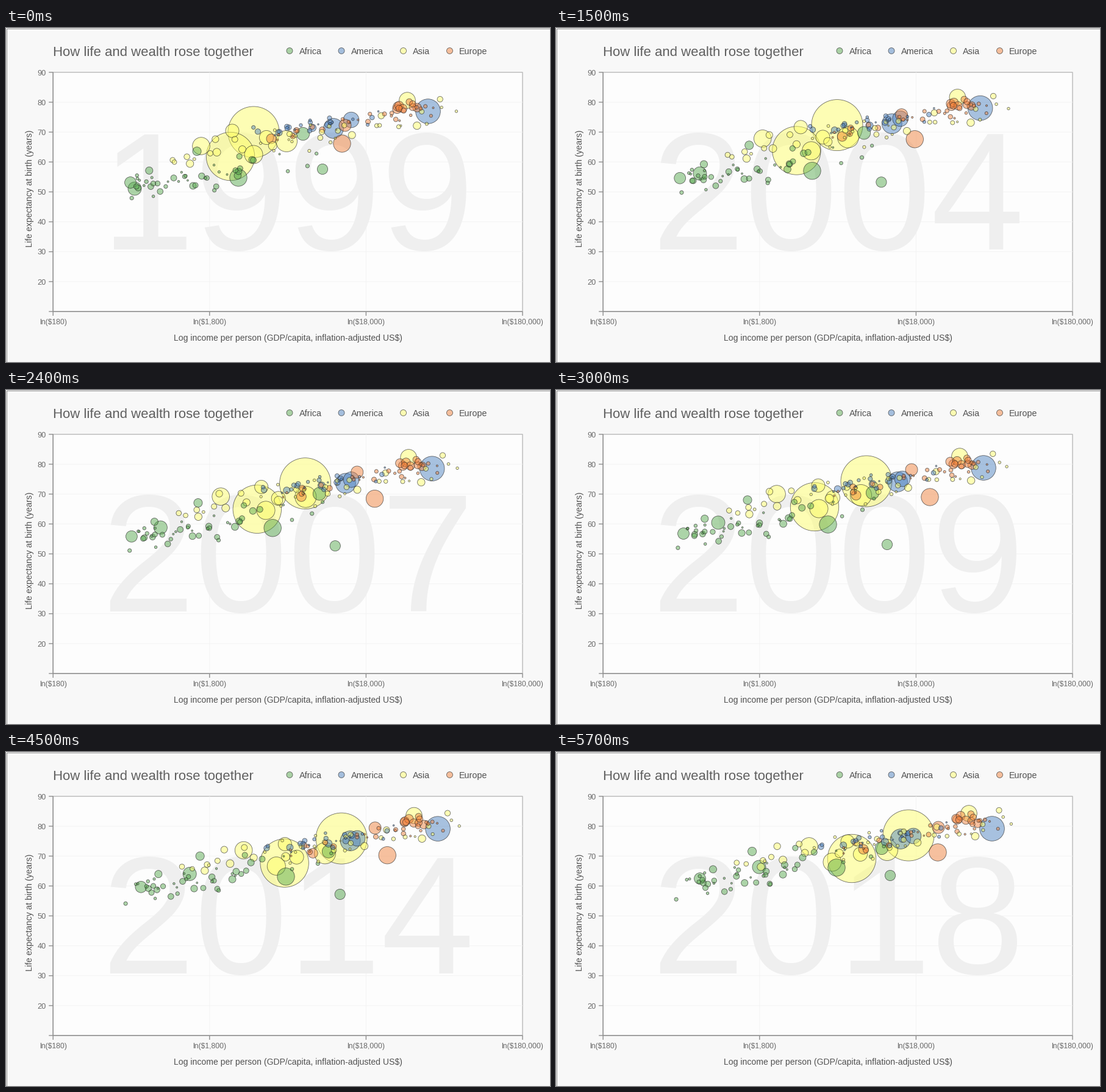
A matplotlib script for the animation above (6 s loop, 892 by 549 pixels).

```python
import numpy as np
import matplotlib.pyplot as plt
from matplotlib.animation import FuncAnimation
from matplotlib.patches import Circle, Rectangle

W, H, DPI = 892, 549, 100
FIRST_YEAR, YEARS, STEP_MS = 1999, 20, 300
LEFT, RIGHT, TOP, BOTTOM = 77.2, 847, 72.8, 466
INK, SOFT, AXIS, GRID = "#525252", "#6a6a6a", "#8f8f8f", "#f4f4f4"
COLORS = {"Africa": "#55a84c", "America": "#4a80bf",
          "Asia": "#ffff66", "Europe": "#f07f38"}

# The most populous countries: radius, then position at start, middle and end
GIANTS = {
    "Asia": [
        (42, (406, 171), (509, 150), (578, 137)),
        (39.7, (368, 211), (424, 192), (485, 175)),
        (17.5, (460, 186), (500, 173), (543, 161)),
        (15, (406, 208), (431, 195), (453, 181)),
        (14.3, (320, 194), (362, 171), (415, 155)),
        (13.3, (658, 119), (662, 109), (677, 101)),
        (11, (371, 169), (430, 157), (478, 147)),
        (11.5, (427, 180), (454, 177), (499, 168)),
    ],
    "Africa": [
        (14.2, (381, 246), (446, 221), (460, 190)),
        (11, (211, 264), (266, 218), (333, 189)),
        (9.4, (204, 254), (209, 236), (236, 208)),
        (10.6, (487, 174), (519, 169), (534, 158)),
        (8.6, (519, 232), (543, 254), (548, 203)),
    ],
    "America": [
        (20.3, (692, 137), (701, 128), (715, 126)),
        (16.4, (537, 165), (560, 151), (565, 143)),
        (12.8, (566, 151), (568, 146), (586, 138)),
    ],
    "Europe": [
        (14.2, (551, 190), (613, 176), (626, 165)),
        (10, (556, 160), (583, 131), (627, 124)),
        (8, (435, 182), (492, 173), (504, 160)),
    ],
}

# The rest fill bands: continent, count, radius range, skew towards the
# poor end, scatter, and the band's two ends in the first and last year
BANDS = [
    ("Africa", 45, (1.2, 8), 2.4, 13, ((205, 262), (590, 205)), ((215, 221), (610, 150))),
    ("America", 24, (1.2, 8), 1.2, 7, ((400, 172), (610, 138)), ((435, 157), (650, 118))),
    ("Asia", 40, (1.2, 9), 1.5, 11, ((275, 218), (780, 128)), ((305, 182), (795, 108))),
    ("Europe", 26, (1.2, 6), 0.9, 6, ((420, 182), (720, 125)), ((450, 164), (735, 108))),
    ("Europe", 9, (5, 11), 1.0, 3, ((640, 129), (682, 127)), ((660, 108), (702, 113))),
]


def giants():
    """A smooth parabola through the three positions of each country."""
    years, keys = np.arange(YEARS), (0, 10, YEARS - 1)
    for name, rows in GIANTS.items():
        for radius, *path in rows:
            fit = np.polyfit(keys, path, 2)
            yield name, radius, np.outer(years ** 2, fit[0]) + np.outer(years, fit[1]) + fit[2]


def crowd(seed=7):
    """Each country keeps its place in a band while the band moves."""
    rng = np.random.default_rng(seed)
    years = np.arange(YEARS)
    t = years[:, None] / (YEARS - 1)
    for name, count, (small, big), skew, scatter, first, last in BANDS:
        for rank in range(count):
            u = rng.beta(1, skew)
            radius = small + (big - small) * rng.beta(1.1, 2) * (1 - 0.3 * u)
            offset = rng.normal(0, (0.3, 1)) * scatter
            begin, end = ((1 - u) * np.array(a) + u * np.array(b) for a, b in (first, last))
            end = end + rng.normal(0, (1, 0.3)) * scatter
            sway = np.sin(years * rng.uniform(0.2, 0.5))[:, None] * (2.5, 0.8)
            yield name, radius, begin * (1 - t) + end * t + offset + sway


plt.rcParams["font.family"] = "Liberation Sans"
fig = plt.figure(figsize=(W / 100, H / 100), dpi=DPI, facecolor="#f8f8f8")
ax = fig.add_axes([0, 0, 1, 1])
ax.set_xlim(0, W)
ax.set_ylim(H, 0)
ax.axis("off")


def px(size):
    return size * 72 / DPI


def label(x, y, text, size, color=INK, ha="left", va="baseline", **kw):
    return ax.text(x, y, text.replace("$", r"\$"), fontsize=px(size),
                   color=color, ha=ha, va=va, **kw)


def line(x0, y0, x1, y1, color=AXIS, width=1.4, z=1.0):
    ax.plot([x0, x1], [y0, y1], color=color, lw=px(width), zorder=z,
            solid_capstyle="butt", snap=False)


def bubble(x, y, radius, name):
    return ax.add_patch(Circle((x, y), radius, facecolor=COLORS[name] + "7a",
                               edgecolor="#222222b0", lw=px(0.8), zorder=5))


def draw_chart():
    ax.add_patch(Rectangle((0.5, 0.5), W - 1, H - 1, fill=False,
                           edgecolor="#8c8c8c", lw=px(1)))
    ax.add_patch(Rectangle((LEFT, TOP), RIGHT - LEFT, BOTTOM - TOP, snap=False,
                           facecolor="#fdfdfd", edgecolor="#b8b8b8",
                           lw=px(1.4), zorder=0))
    for i in range(9):
        y = TOP + (BOTTOM - TOP) * i / 8
        line(LEFT - 7, y, LEFT, y)
        if 0 < i < 8:
            line(LEFT, y, RIGHT, y, GRID, 1, 0.5)
        if i < 8:
            label(66, y + 4.7, str(90 - 10 * i), 12.8, SOFT, "right")
    for i in range(4):
        x = LEFT + (RIGHT - LEFT) * i / 3
        line(x, BOTTOM, x, BOTTOM + 7)
        if 0 < i < 3:
            line(x, TOP, x, BOTTOM, GRID, 1, 0.5)
        label(x, 487.3, f"ln(${180 * 10 ** i:,})", 12.1, SOFT, "center")
    line(LEFT, TOP, LEFT, BOTTOM)
    line(LEFT, BOTTOM, RIGHT, BOTTOM)

    label(77, 46, "How life and wealth rose together", 22.2, "#606060")
    label(462.3, 514.3, "Log income per person (GDP/capita, inflation-adjusted US$)",
          14, ha="center")
    label(38.6, 264, "Life expectancy at birth (years)", 14,
          ha="center", va="center", rotation=90)
    for name, x in zip(COLORS, (465, 550, 651.5, 727.5)):
        bubble(x, 37.5, 5, name)
        label(x + 15.5, 42.8, name, 14.4)


draw_chart()
year_text = label(462, 364, str(FIRST_YEAR), 275, "#efefef", "center", zorder=0.7)

countries = sorted([*giants(), *crowd()], key=lambda c: -c[1])
movers = [(bubble(*path[0], radius, name), path) for name, radius, path in countries]


def update(frame):
    year_text.set_text(str(FIRST_YEAR + frame))
    for circle, path in movers:
        circle.center = path[frame]
    return [year_text] + [circle for circle, _ in movers]


anim = FuncAnimation(fig, update, frames=YEARS, interval=STEP_MS,
                     init_func=lambda: update(0), repeat=True, repeat_delay=0)
plt.show()
```
